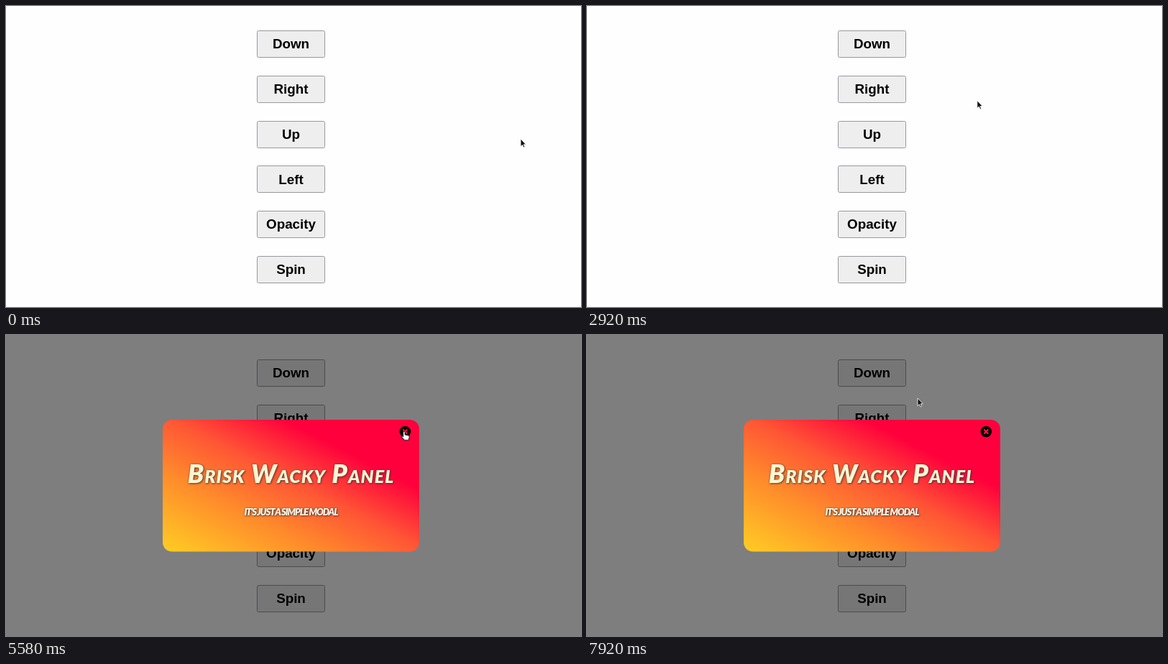
An HTML page that plays this animation: 800 by 419 pixels, repeating every 8000 ms.

```html
<!DOCTYPE html>
<html lang="en">
<head>
<meta charset="utf-8">
<title>Modal demo</title>
<style>
html, body { margin: 0; height: 100%; overflow: hidden; background: #fefdff; }
svg { display: block; width: 100vw; height: 100vh; }
text { text-anchor: middle; }
#buttons rect { fill: #efeeef; stroke: #98979c; }
#buttons text { font: bold 18.8px "Liberation Sans", Arial, sans-serif; }
.title, .note { font-family: Lato, "Open Sans", sans-serif; font-style: italic; font-weight: 900;
  filter: drop-shadow(1px 1px 1px #3338) drop-shadow(0 0 1px #333a); }
.title { font-size: 36px; font-variant: small-caps; letter-spacing: 1px; fill: #fbf6d3; }
.note { font-size: 13px; letter-spacing: -1.1px; fill: #fffdf0; }
</style>
</head>
<body>
<svg viewBox="0 0 800 419">
  <defs>
    <linearGradient id="sunset" x1="0" y1="1" x2="1" y2="0">
      <stop offset="0" stop-color="#ffcd24"/>
      <stop offset=".3" stop-color="#ff8c2b"/>
      <stop offset=".52" stop-color="#ff5535"/>
      <stop offset=".74" stop-color="#ff003c"/>
    </linearGradient>
  </defs>
  <g id="buttons"></g>
  <rect id="backdrop" width="800" height="419"/>
  <g id="modal">
    <rect x="218" y="118" width="357" height="183.5" rx="13" fill="url(#sunset)"/>
    <text class="title" x="396.5" y="206">Brisk Wacky Panel</text>
    <text class="note" x="396.5" y="250.5">IT'S JUST A SIMPLE MODAL</text>
    <circle cx="555.3" cy="134.5" r="7.8"/>
    <path d="M552.3 131.5l6 6m0-6l-6 6" stroke="#ff1a3c" stroke-width="2.2"/>
  </g>
  <circle id="ripple" fill="#5a6991" stroke="#5a6ea8"/>
  <g id="cursor" stroke-linejoin="round">
    <path id="arrow" d="M0 0V10.6L2.5 8.4 4.1 12 5.8 11.2 4.2 7.8H7.4Z" fill="#111" stroke="#fff" stroke-width=".8"/>
    <path id="hand" d="M-1.3 .3Q0-1.3 1.3 .3V4.3L6 5.2Q7.7 5.8 7.3 8L6.3 11.8H.3L-3.8 7.2Q-3.3 5.6-1.3 7Z" fill="#fff" stroke="#222" stroke-width="1.1"/>
  </g>
</svg>
<script>
const LOOP = 8000, OPEN_MS = 440, CLOSE_MS = 300, RIPPLE_MS = 270;
const $ = id => document.getElementById(id);

// Each visit: opening time, closing time, offset of the hidden modal
const visits = [
  [1095, 2580, 0, 419],
  [4000, 5920, 800, 0],
  [7000, Infinity, 0, -419]
];
const clicks = visits.flatMap(v => [v[0] - 30, v[1] - 30]);

// Pointer stops: time, x, y
const stops = [
  [80, 716, 185], [950, 413, 52], [1700, 413, 52], [2400, 556, 134],
  [2720, 556, 134], [3750, 424, 111], [4700, 424, 111], [5670, 557, 135],
  [6130, 557, 135], [6800, 415, 178], [7500, 415, 178], [7920, 460, 88], [8060, 476, 88]
];

$('buttons').innerHTML = ['Down', 'Right', 'Up', 'Left', 'Opacity', 'Spin'].map((label, i) => {
  const y = 34 + 62.8 * i;
  return `<rect x="349.5" y="${Math.round(y) + .5}" width="94" height="37" rx="2"/>
    <text x="396.5" y="${y + 25.2}">${label}</text>`;
}).join('');

const clamp = v => Math.min(1, Math.max(0, v));
const smooth = v => v * v * (3 - 2 * v);
const bezier = (u, a, b) => 3 * u * (1 - u) ** 2 * a + 3 * u * u * (1 - u) * b + u ** 3;

// The CSS "ease" curve
function ease(v) {
  v = clamp(v);
  if (v === 0 || v === 1) return v;
  let lo = 0, hi = 1;
  for (let i = 0; i < 20; i++) {
    const mid = (lo + hi) / 2;
    if (bezier(mid, .25, .25) < v) lo = mid; else hi = mid;
  }
  return bezier(lo, .1, 1);
}

function pointer(t) {
  const i = stops.findIndex(s => s[0] > t);
  if (i < 1) return stops[0].slice(1);
  const [from, to] = [stops[i - 1], stops[i]];
  const k = smooth((t - from[0]) / (to[0] - from[0]));
  return [1, 2].map(n => from[n] + (to[n] - from[n]) * k);
}

function draw(t) {
  const [open, close, dx, dy] = visits.findLast(v => t >= v[0]) || visits[0];
  const shown = ease((t - open) / OPEN_MS) - ease((t - close) / CLOSE_MS);
  const hidden = 1 - shown;
  $('backdrop').setAttribute('opacity', shown / 2);
  $('modal').setAttribute('transform', `translate(${dx * hidden} ${dy * hidden})`);
  $('modal').style.display = shown > 0 ? '' : 'none';

  const [x, y] = pointer(t);
  const onClose = Math.hypot(x - 556, y - 134) < 9;
  $('cursor').setAttribute('transform', `translate(${x} ${y})`);
  $('arrow').style.display = onClose ? 'none' : '';
  $('hand').style.display = onClose ? '' : 'none';

  const click = clicks.findLast(c => t >= c && t < c + RIPPLE_MS);
  const age = t - click;
  const ripple = $('ripple');
  ripple.style.display = click === undefined ? 'none' : '';
  if (click !== undefined) {
    ripple.setAttribute('cx', x + 1);
    ripple.setAttribute('cy', y + 3);
    ripple.setAttribute('r', 5 + age / 60);
    ripple.setAttribute('opacity', .7 * (1 - age / RIPPLE_MS));
  }
}

const start = performance.now();
function tick() {
  draw((performance.now() - start) % LOOP);
  requestAnimationFrame(tick);
}
tick();
</script>
</body>
</html>
```
